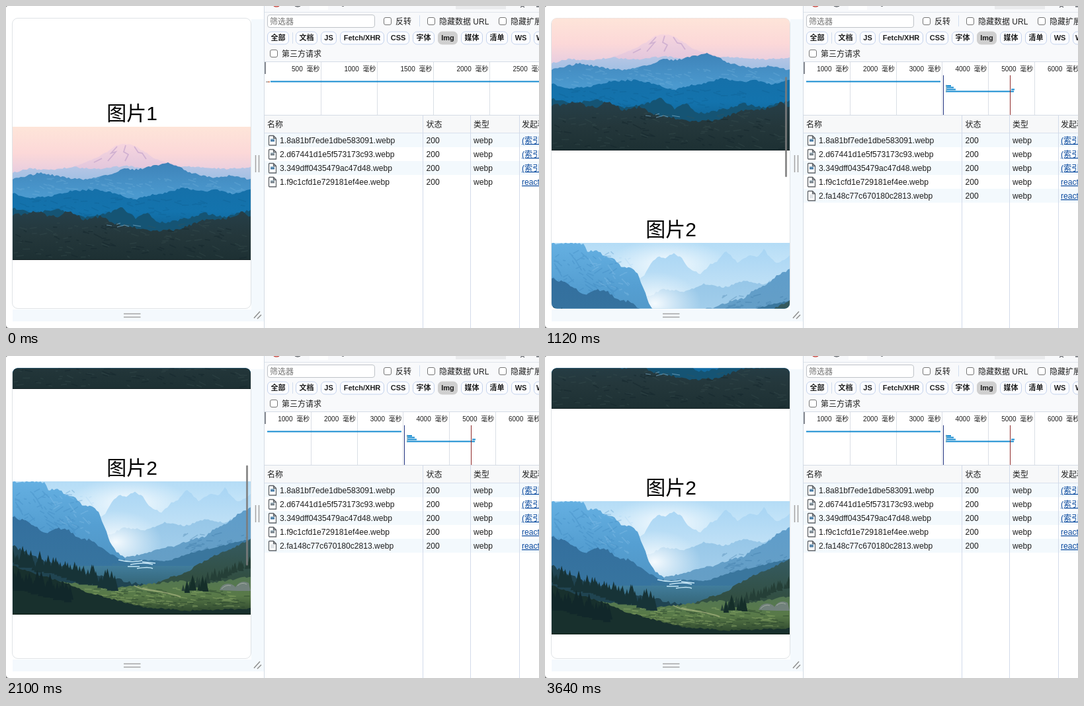
Animation, 806 px wide and 488 px high, one loop 4690 ms. Source, as an HTML page:

```html
<!DOCTYPE html>
<html lang="zh">
<head>
<meta charset="utf-8">
<title>图片懒加载</title>
<style>
html, body { margin: 0; width: 100%; height: 100%; overflow: hidden; background: #fff; }
svg { display: block; width: 806px; height: 488px; }
text { font-family: "Liberation Sans", "Noto Sans CJK SC", "Noto Sans CJK", sans-serif; font-size: 12px; fill: #1f1f1f; white-space: pre; }
.title { font-size: 30px; fill: #000; text-anchor: middle; }
.cell { font-size: 12.15px; }
.link { font-size: 12.15px; fill: #0b4a9e; text-decoration: underline; }
.chip { font-size: 11px; font-weight: 600; text-anchor: middle; }
.tick { font-size: 10px; text-anchor: end; }
</style>
</head>
<body>
<svg id="stage" viewBox="0 0 806 488"></svg>
<script>
const LOOP = 4690, STEP = 70, SECTION = 342;
const stage = document.getElementById('stage');

function random(seed) {
  return () => {
    seed = (seed * 16807) % 2147483647;
    return seed / 2147483647;
  };
}
const rect = (x, y, w, h, fill, extra = '') =>
  `<rect x="${x}" y="${y}" width="${w}" height="${h}" fill="${fill}" ${extra}/>`;
const text = (x, y, value, cls = '', extra = '') =>
  `<text x="${x}" y="${y}" class="${cls}" ${extra}>${value}</text>`;
const line = (d, stroke, width = 1, extra = '') =>
  `<path d="${d}" fill="none" stroke="${stroke}" stroke-width="${width}" ${extra}/>`;
const gradient = (id, ...colors) =>
  `<linearGradient id="${id}" x2="0" y2="1">${colors.map((c, i) =>
    `<stop offset="${i / (colors.length - 1)}" stop-color="${c}"/>`).join('')}</linearGradient>`;
const group = (id, content, extra = '') => `<g id="${id}" ${extra}>${content}</g>`;

// Jagged skyline through "x,y" points, filled down to the picture's bottom.
function ridge(points, fill, rough, seed, extra = '') {
  const rnd = random(seed);
  const p = points.split(' ').map(s => s.split(',').map(Number));
  let d = `M${p[0]}`;
  for (let i = 1; i < p.length; i++) {
    const [ax, ay] = p[i - 1], [bx, by] = p[i];
    const n = Math.max(1, Math.round((bx - ax) / 3));
    for (let k = 1; k <= n; k++) {
      const y = ay + (by - ay) * k / n + (rnd() - .5) * rough;
      d += `L${(ax + (bx - ax) * k / n).toFixed(1)},${y.toFixed(1)}`;
    }
  }
  return `<path d="${d}V202H${p[0][0]}Z" fill="${fill}" ${extra}/>`;
}

// Short slanted strokes giving rock and grass their grain.
function grain(count, x, y, w, h, color, opacity, seed, slope = .8) {
  const rnd = random(seed);
  let d = '';
  for (let i = 0; i < count; i++) {
    const len = 3 + rnd() * 9;
    d += `M${(x + rnd() * w).toFixed(1)},${(y + rnd() * h).toFixed(1)}l${len.toFixed(1)},${(len * slope * (rnd() - .3)).toFixed(1)}`;
  }
  return line(d, color, 1.6, `opacity="${opacity}"`);
}

function trees(count, x0, x1, base, fill, seed, size) {
  const rnd = random(seed);
  let d = '';
  for (let i = 0; i < count; i++) {
    const x = x0 + (x1 - x0) * (i + rnd()) / count;
    const h = size * (.6 + rnd() * .8), w = h * .24, y = base(x) + rnd() * 6;
    d += `M${x.toFixed(1)},${(y - h).toFixed(1)}l${w.toFixed(1)},${h.toFixed(1)}h${(-2 * w).toFixed(1)}z`;
  }
  return `<path d="${d}" fill="${fill}"/>`;
}

const sunrise = () =>
  rect(0, 0, 360, 202, 'url(#dawn)') +
  ridge('84,64 105,56 125,48 143,38 157,28 170,26 183,28 200,38 216,49 235,54 265,64', 'url(#snow)', 1.5, 11) +
  line('M158,30l-9,10l7,-2l-12,14M171,28l-3,10l7,4l-5,10M184,30l6,9l6,1l6,9M135,48l-12,6', '#c2a1cb', 1.8, 'opacity=".65"') +
  ridge('0,70 25,63 55,66 90,61 130,64 170,59 215,64 270,60 320,64 360,62', 'url(#haze)', 2.5, 21) +
  ridge('0,80 40,70 60,73 88,78 110,80 150,72 166,64 190,65 212,59 235,55 250,59 265,68 300,77 330,74 360,80', 'url(#far)', 3, 31) +
  grain(100, 5, 78, 345, 28, '#82bbe3', .24, 33) +
  ridge('0,101 30,108 60,105 90,97 130,95 160,102 185,111 205,104 230,101 258,92 285,98 310,96 335,102 360,94', 'url(#mid)', 3, 41) +
  grain(90, 5, 108, 345, 30, '#0a527f', .22, 43) +
  ridge('0,124 30,130 70,126 110,137 140,132 166,123 186,139 204,130 220,146 250,142 290,131 320,137 360,126', '#155474', 4, 51) +
  ridge('0,135 16,132 40,129 52,134 65,137 85,127 110,142 135,135 155,147 178,151 200,157 240,157 270,148 290,142 315,139 335,137 345,129 360,135', 'url(#near)', 5, 61) +
  grain(80, 0, 144, 350, 54, '#3d5354', .3, 63) +
  grain(60, 0, 150, 350, 50, '#14272c', .5, 67) +
  line('M142,149l8,1M158,152l11,-3l7,2M182,149l12,2M157,148l6,-2', '#77a9c4', 1.2, 'opacity=".75"') +
  rect(0, 201, 360, 1, '#131f22');

const valley = () =>
  rect(0, 0, 360, 202, 'url(#sky)') +
  `<ellipse cx="175" cy="32" rx="90" ry="38" fill="url(#glow)"/>` +
  ridge('120,58 140,50 150,32 160,20 172,23 185,15 197,24 206,37 225,48 240,32 250,28 264,12 274,22 281,29 300,18 310,22 321,10 332,24 340,31 360,20', 'url(#peaks)', 3, 71) +
  ridge('130,88 170,70 200,74 230,62 260,68 290,58 320,62 360,48', 'url(#mist)', 3, 81) +
  `<ellipse cx="156" cy="92" rx="70" ry="48" fill="url(#glow)"/>` +
  ridge('0,1 30,0 48,2 54,13 68,11 80,20 92,22 105,35 122,39 130,46 135,60 142,76 147,91 157,107 172,118', 'url(#cliff)', 3, 91) +
  grain(80, 2, 12, 95, 72, '#327eb4', .26, 93, 2.5) +
  grain(30, 55, 20, 65, 70, '#9acbed', .25, 94, 2.5) +
  ridge('170,116 200,109 225,101 250,97 270,88 290,84 305,72 325,64 340,50 360,40', 'url(#slope)', 3, 101) +
  grain(50, 250, 80, 105, 35, '#2f6d9a', .28, 103, -1) +
  ridge('0,54 20,60 34,68 50,78 70,71 85,74 98,86 118,89 132,100 148,111 172,122 220,126', 'url(#foothill)', 4, 111) +
  ridge('150,125 190,119 235,121 270,108 310,99 360,87', '#3a769d', 2, 121) +
  rect(0, 128, 360, 74, 'url(#floor)') +
  line('M160,119q20,5 36,1M178,126q22,-4 34,0M196,122l20,2M174,129h18M188,132q18,-3 24,0', '#c6e6f6', 1.4) +
  ridge('0,98 20,107 45,121 75,127 105,138 140,144 180,154 220,158 360,160', '#204451', 5, 131) +
  ridge('205,160 230,148 262,139 280,126 305,113 330,102 360,88', 'url(#hill)', 3, 141) +
  ridge('0,150 60,150 110,156 160,161 205,156 250,151 300,154 360,144', 'url(#meadow)', 3, 151) +
  grain(120, 90, 160, 245, 30, '#9ab46f', .4, 153, .3) +
  grain(90, 120, 163, 230, 35, '#263f2c', .45, 157, .3) +
  line('M184,158q12,7 32,8q24,4 38,9M196,162l20,4', '#bdc58f', 2, 'opacity=".55"') +
  ridge('0,128 40,142 85,155 110,167 150,178 195,190 260,196 360,193', '#18302d', 3, 161) +
  trees(42, 0, 155, x => 122 + x * .27, '#173337', 171, 22) +
  trees(26, 0, 90, x => 158 + x * .24, '#11272a', 181, 26) +
  trees(30, 258, 360, x => 164 - (x - 258) * .36, '#253f37', 191, 14) +
  trees(6, 264, 296, () => 164, '#152e29', 193, 19) +
  `<path d="M313,165q3,-10 13,-10q10,0 14,11zM337,160q8,-12 20,-6l3,12h-20z" fill="#71817b"/>` +
  `<path d="M316,163q6,-7 14,-5M340,158q7,-6 14,-2" stroke="#a2aca2" fill="none"/>` +
  rect(0, 200, 360, 2, '#172a23');

const defs = `<defs>
  <clipPath id="phone"><rect x="10" y="18.5" width="360" height="440" rx="8"/></clipPath>
  <clipPath id="frame"><rect width="360" height="202"/></clipPath>
  <radialGradient id="glow"><stop stop-color="#fafdff" stop-opacity=".95"/><stop offset="1" stop-color="#eaf5fc" stop-opacity="0"/></radialGradient>
  ${gradient('dawn', '#fee5d9', '#fcd8d8', '#dfc9e2', '#a9c4e8', '#8ab9e2', '#8ab9e2')}
  ${gradient('snow', '#f6d5de', '#d8bfdc', '#b8bfe2', '#9dbce2')}
  ${gradient('haze', '#b7c6e5', '#88b8e2', '#62a6d9', '#62a6d9')}
  ${gradient('far', '#3e83b9', '#4b99ce', '#529fd2', '#2a7bb2')}
  ${gradient('mid', '#1570a9', '#1373ad', '#0f5e8e', '#154c6d')}
  ${gradient('near', '#263f49', '#24373b', '#1d3033')}
  ${gradient('sky', '#b4dcf6', '#d8eefb', '#e9f6fd', '#c0dff2')}
  ${gradient('peaks', '#a8d5f4', '#c3e2f6', '#d6ecf8', '#b4d8ee')}
  ${gradient('mist', '#94c5e7', '#a9d2ed', '#8bbcdd')}
  ${gradient('cliff', '#65b0e2', '#559fd2', '#5094c2', '#3d7ca6')}
  ${gradient('slope', '#5f9dca', '#669fc6', '#3e7ca6')}
  ${gradient('foothill', '#336f9e', '#37749f', '#2d6183')}
  ${gradient('floor', '#417d9c', '#315f6d', '#28463c')}
  ${gradient('hill', '#355b62', '#324f43', '#395a3b')}
  ${gradient('meadow', '#537653', '#597a48', '#273f2a')}
</defs>`;

const section = (i, art) =>
  text(190.5, 173 + i * SECTION, `图片${i + 1}`, 'title') +
  `<g transform="translate(10 ${183 + i * SECTION})" clip-path="url(#frame)">${art}</g>`;

const phone =
  rect(371, 20, 19, 458, '#f4f9fd') + rect(10, 460, 361, 18, '#f4f9fd') +
  rect(9.5, 18.5, 361, 440, '#fff', 'rx="8.5" stroke="#dfe3e6"') +
  `<g clip-path="url(#phone)">${group('page', section(0, sunrise()) + section(1, valley()))}</g>` +
  rect(363, 0, 3, 152, '#7b7b7b', 'id="bar" rx="1.5" opacity="0"') +
  line('M377.5,226v26M382.5,226v26M178,466.5h25.5M178,471.5h25.5', '#a3a3a3', 1.5) +
  line('M375,473l9,-10M380,474l6,-6', '#8f8f8f', 1.5) +
  `<path d="M0,0h3q-3,0 -3,3zM0,488h5q-5,0 -5,-5z" fill="#777"/>`;

const checkbox = (x, y, label) =>
  rect(x + .5, y + .5, 11, 11, '#fff', 'rx="2.5" stroke="#767676"') + text(x + 18, y + 10.5, label);

const chips = [
  [395, 33, '全部'], [438, 33, '文档'], [476, 24, 'JS'], [505, 67, 'Fetch/XHR'], [576, 34, 'CSS'], [615, 33, '字体'],
  [653, 30, 'Img'], [688, 33, '媒体'], [726, 33, '清单'], [764, 29, 'WS'], [798, 40, 'Wasm']
].map(([x, w, label]) => {
  const on = label === 'Img';
  return rect(x + .5, 39, w - 1, 19, on ? '#cfcfcf' : '#fbfcff', `rx="6" stroke="${on ? '#cfcfcf' : '#c5d3ec'}"`) +
    text(x + w / 2, 52.3, label, 'chip');
}).join('');

const scale = (id, unit, gap) => group(id, [1, 2, 3, 4, 5, 6].map(i => {
  const x = 391.5 + gap * i;
  return line(`M${Math.floor(x) + .5},85v80`, '#dadfe6') + text(x - 2, 99, `${unit * i} &#160;毫秒`.replace(' ', ''), 'tick', 'word-spacing="3"');
}).join(''));

const BLUE = '#168bd0';
const timeline =
  rect(391, 85, 415, 80, '#fff') +
  scale('fine', 500, 85) + scale('coarse', 1000, 69.75) +
  rect(391, 85, 2, 18, '#858990') +
  group('pending', rect(393, 114, 3, 2, '#b9b9b9') + rect(396, 114, 3, 2, '#d49a83') + rect(400, 113.5, 406, 2, BLUE)) +
  group('loaded',
    rect(395, 113.5, 203, 2, BLUE) + rect(606, 120, 8, 2, BLUE) + rect(607, 122.5, 11, 2, BLUE) +
    rect(607, 125.5, 14, 2, BLUE) + rect(606, 128.5, 98, 2, BLUE) + rect(705, 125.5, 5, 2, BLUE) + rect(704, 128.5, 5, 2, BLUE) +
    rect(606, 119.5, 2, 11, '#7aa8bb', 'opacity=".6"') +
    line('M602.5,105v60', '#20317f') + line('M703.5,105v60', '#8f2929')) +
  line('M391,84.5h415M391,165.5h415', '#d5dce6');

const files = ['1.8a81bf7ede1dbe583091', '2.d67441d1e5f573173c93', '3.349dff0435479ac47d48', '1.f9c1cfd1e729181ef4ee', '2.fa148c77c670180c2813'];

function row(name, i) {
  const y = 193 + 21 * i, last = i === 4;
  const thumb = rect(400, y + 8.5, 6, 4, i % 2 ? '#77828a' : '#4a7ca5') + rect(400, y + 8.5, 6, 1, '#aac3d2');
  return group(`row${i}`,
    (i % 2 ? '' : rect(391, y, 415, 21, '#f3f9fd')) +
    `<path d="M398.5,${y + 3.5}h6l4,4v10.5h-10q-1,0 -1,-1v-12.5q0,-1 1,-1zM404.5,${y + 3.5}v4h4" fill="#fff" stroke="#5f6368" stroke-width="1.3"/>` +
    (last ? rect(400, y + 8.5, 6, 6, '#e1e5e8') + group('thumb', thumb) : thumb) +
    text(414, y + 15, `${name}.webp`, 'cell') +
    group(`status${i}`, text(635.5, y + 15, '200', 'cell') + text(707, y + 15, 'webp', 'cell')) +
    text(780, y + 15, i < 3 ? '(索引)' : 'react-dom', 'link'));
}

const tools =
  rect(391, 0, 415, 85, '#f8f9fb') +
  rect(459, 0, 28, 6, '#fff') + rect(680, 0, 76, 5, '#eaebed') +
  line('M405,0q4,2 8,0', '#c94a43', 1.5) + line('M437,0q4,2 8,0M508,0h3M778,2l3,-2l3,2M802,1h4', '#5f6368', 1.3) +
  line('M391,9.5h415', '#e0e5ec') +
  rect(395.5, 13.5, 162, 19, '#fff', 'rx="3.5" stroke="#bfc3c8"') +
  text(399, 28, '筛选器', '', 'style="fill:#757575"') +
  checkbox(571, 17, '反转') + checkbox(637, 17, '隐藏数据 URL') + checkbox(745, 17, '隐藏扩展程序') +
  line('M625.5,14v17M433.5,40v17', '#d3deef') +
  chips + checkbox(399, 66, '第三方请求');

const table =
  rect(391, 166, 415, 322, '#fff') + rect(391, 166, 415, 26, '#f7f8f9') +
  text(395, 184, '名称') + text(635.5, 184, '状态') + text(707, 184, '类型') + text(780, 184, '发起程序') +
  line('M391,192.5h415', '#d9e1ed') + files.map(row).join('') +
  line('M630.5,166v322M702.5,166v322M776.5,166v322', '#d3dbea');

stage.innerHTML = defs + rect(0, 0, 806, 488, '#fff') + phone + tools + timeline + table + line('M390.5,0v488', '#d3dae4');

const scrollKeys = [
  [700, 0], [770, 14], [840, 46], [910, 83], [980, 118], [1050, 145], [1120, 166], [1190, 183], [1260, 195], [1330, 203], [1400, 208],
  [1610, 208], [1680, 235], [1750, 270], [1820, 297], [1890, 311], [1960, 321], [2030, 329], [2100, 335], [2170, 337],
  [2310, 337], [2660, 323], [2870, 310], [2940, 307], [3010, 305]
];
function scrollAt(t) {
  const i = scrollKeys.findIndex(k => k[0] > t);
  if (i === 0) return 0;
  if (i < 0) return scrollKeys.at(-1)[1];
  const [t0, a] = scrollKeys[i - 1], [t1, b] = scrollKeys[i];
  return Math.round(a + (b - a) * (t - t0) / (t1 - t0));
}

const node = id => document.getElementById(id);
const show = (id, on) => node(id).setAttribute('display', on ? 'inline' : 'none');

function draw(time) {
  const t = Math.floor((time % LOOP) / STEP) * STEP;
  const scroll = scrollAt(t), requested = t >= 840, done = t >= 980;
  node('page').setAttribute('transform', `translate(0 ${-scroll})`);
  node('bar').setAttribute('y', 50 + scroll * .345);
  node('bar').setAttribute('opacity', t < 770 ? 0 : .85 * Math.min(1, Math.max(0, (3640 - t) / 350)));
  show('pending', !requested);
  show('loaded', requested);
  show('row4', requested);
  show('fine', !done);
  show('coarse', done);
  show('status4', done);
  show('thumb', t >= 2940);
}

let start;
function tick(now) {
  start ??= now;
  draw(now - start);
  requestAnimationFrame(tick);
}
draw(0);
requestAnimationFrame(tick);
</script>
</body>
</html>
```
